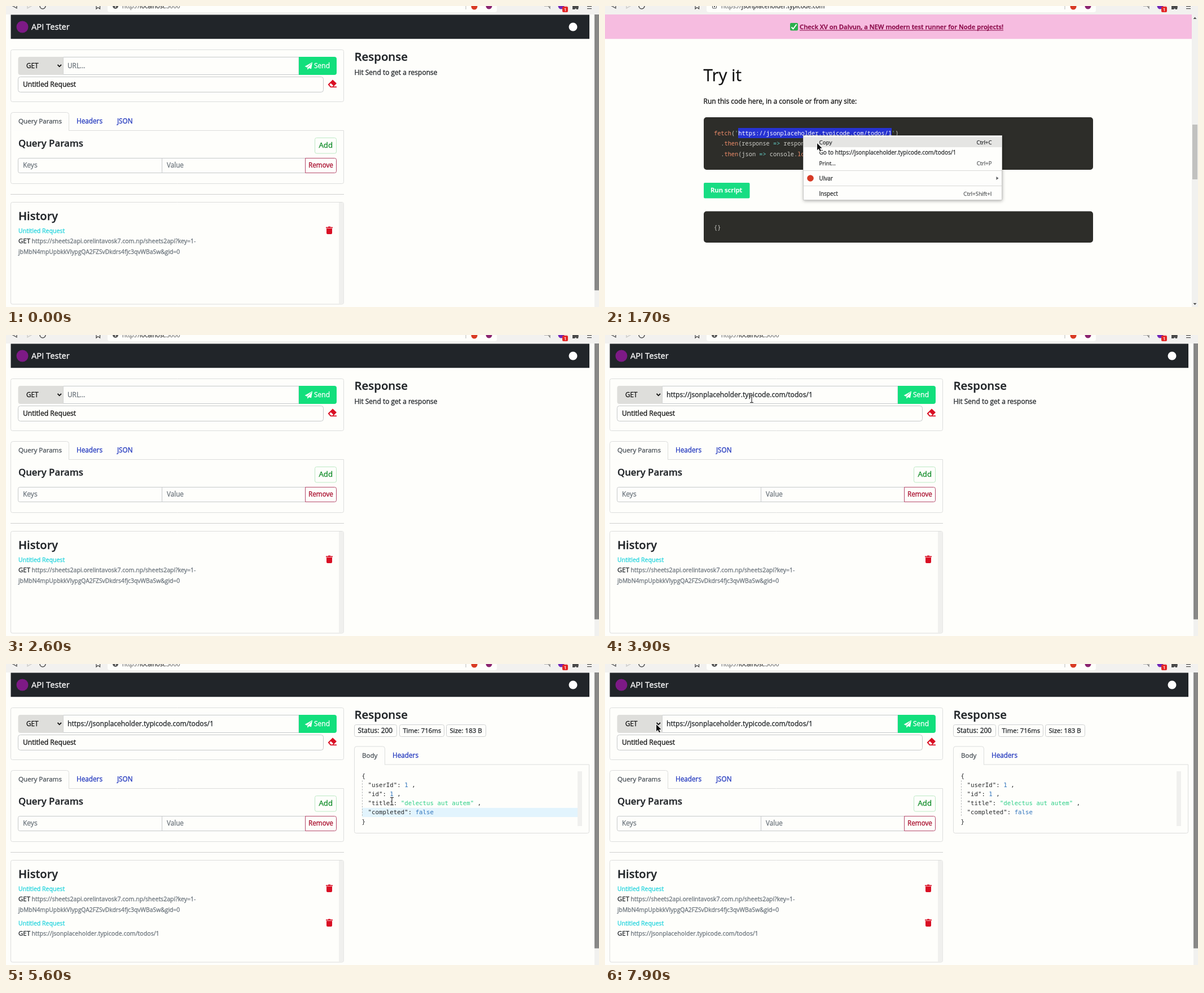
These frames come from a looping animation (1051 by 533 pixels, 8 s). An HTML page with a canvas:

```html
<!DOCTYPE html>
<html lang="en">
<head>
<meta charset="utf-8">
<title>API Tester</title>
<style>
html, body { margin: 0; width: 100%; height: 100%; overflow: hidden; background: #fefefb; }
canvas { display: block; }
</style>
</head>
<body>
<canvas id="stage" width="1051" height="533"></canvas>
<script>
const ctx = document.getElementById('stage').getContext('2d');
const LOOP = 8000;
const SANS = '"Open Sans", "Noto Sans", sans-serif';
const CODE = '"Noto Sans Mono", "DejaVu Sans Mono", monospace';
const MONO = '"DejaVu Sans Mono", monospace';
const PAGE = '#fefefb', INK = '#212529', MUTED = '#6c757d', LINE = '#dcdddc';
const FIELD = '#c6c9cb', LINK = '#1f35bd', RED = '#d90f24', GREEN = '#12df7c';
const API_URL = 'https://jsonplaceholder.typicode.com/todos/1';

// Pointer track: time, x, y, shape. It is hidden where no place is given.
const pointer = [
  [0], [1000, 312, 181, 'arrow'], [1200, 357, 227, 'beam'], [1500, 350, 229, 'arrow'],
  [1600, 361, 236, 'arrow'], [1700, 376, 243, 'arrow'], [2000, 330, 190, 'arrow'],
  [2100, 250, 122, 'arrow'], [2200, 192, 75, 'arrow'], [2600],
  [2800, 199, 38, 'arrow'], [2900, 207, 56, 'arrow'], [3100, 150, 80, 'arrow'],
  [3200, 114, 105, 'beam'], [3600, 118, 115, 'beam'], [3800, 170, 115, 'beam'],
  [3900, 260, 113, 'beam'], [4000, 370, 111, 'beam'], [4100, 470, 108, 'beam'],
  [4200, 530, 107, 'arrow'], [4300, 550, 107, 'arrow'], [5100, 605, 157, 'arrow'],
  [5200, 634, 190, 'arrow'], [5400, 676, 283, 'beam'], [5500, 688, 264, 'beam'],
  [5600, 684, 243, 'beam'], [5700, 545, 205, 'arrow'], [5800, 360, 168, 'arrow'],
  [5900, 218, 148, 'arrow'], [6100, 172, 122, 'arrow'], [6200, 120, 90, 'arrow'],
  [6300, 80, 77, 'arrow'], [6400, 84, 106, 'arrow'], [7800, 87, 107, 'arrow'],
  [7900, 91, 107, 'arrow']
];

function rect(x, y, w, h, color) {
  ctx.fillStyle = color;
  ctx.fillRect(x, y, w, h);
}

function box(x1, y1, x2, y2, radius, fill, stroke) {
  ctx.beginPath();
  ctx.roundRect(x1, y1, x2 - x1, y2 - y1, radius);
  if (fill) { ctx.fillStyle = fill; ctx.fill(); }
  if (stroke) { ctx.strokeStyle = stroke; ctx.lineWidth = 1; ctx.stroke(); }
}

function circle(x, y, r, color) {
  ctx.beginPath();
  ctx.arc(x, y, r, 0, Math.PI * 2);
  ctx.fillStyle = color;
  ctx.fill();
}

function trace(points, close) {
  ctx.beginPath();
  points.forEach(([x, y]) => ctx.lineTo(x, y));
  if (close) ctx.closePath();
}

function shape(points, color) {
  trace(points, true);
  ctx.fillStyle = color;
  ctx.fill();
}

function line(points, color, width = 1) {
  trace(points);
  ctx.strokeStyle = color;
  ctx.lineWidth = width;
  ctx.stroke();
}

// Proportional text gets a hairline outline for a slightly sturdier weight.
function text(str, x, y, size, color = INK, weight = 400, family = SANS) {
  ctx.font = `${weight} ${size}px ${family}`;
  ctx.fillStyle = color;
  ctx.fillText(str, x, y);
  if (family === SANS) {
    ctx.strokeStyle = color;
    ctx.lineWidth = 0.3;
    ctx.strokeText(str, x, y);
  }
  return x + ctx.measureText(str).width;
}

function textRight(str, x, y, size, color) {
  ctx.textAlign = 'right';
  text(str, x, y, size, color);
  ctx.textAlign = 'left';
}

// Parts alternate: string, colour, string, colour...
function runs(parts, x, y, size, family = SANS) {
  for (let i = 0; i < parts.length; i += 2) {
    x = text(parts[i], x, y, size, parts[i + 1], 400, family);
  }
}

function drawToolbar(secure) {
  rect(0, 0, 1051, 15, '#f2f1ef');
  box(180, -14, 870, 11, 4, PAGE);
  const dark = '#4a4a4a';
  line([[19, -3], [12, 0], [19, 4], [19, -3]], dark, 1.3);
  line([[38, -3], [45, 0], [38, 4], [38, -3]], '#c6c5c3', 1.2);
  ctx.beginPath();
  ctx.arc(65, 0, 5, -0.4, Math.PI);
  ctx.strokeStyle = dark;
  ctx.lineWidth = 1.4;
  ctx.stroke();
  line([[160, -4], [160, 5], [163, 2.5], [166.5, 5], [166.5, -4]], dark, 1.3);
  if (secure) {
    box(190.5, -2, 197.5, 4, 1, null, '#555');
    rect(193, 0, 2, 2, '#555');
    runs(['https://', '#777', 'jsonplaceholder.typicode.com', '#383838'], 206, 4, 10.55);
  } else {
    circle(194, 0, 5, '#555');
    rect(193.4, -1, 1.3, 4, '#fff');
    runs(['http://', '#777', 'localhost', '#383838', ':3000', '#777'], 206, 4, 10.6);
  }
  rect(814.5, 0, 1, 6, '#b9b9b7');
  circle(830, 1, 5.5, '#d93a24');
  circle(856, 0, 5.5, '#8b2470');
  line([[954, 0], [961, 0], [964, 4], [964, -2]], '#777', 1.2);
  circle(984, 0, 5.5, '#7028b8');
  box(986, 1, 996, 11, 2, '#e32626');
  text('1', 989, 9, 7.5, '#fff');
  shape([[1004, -3], [1014, -3], [1014, 0], [1015, 1], [1014, 6], [1011, 6],
    [1010, 4], [1008, 6], [1004, 6]], dark);
  rect(1030, 0, 8, 1.2, dark);
  rect(1030, 4, 8, 1.2, dark);
}

function drawTabs(x, top, width, right, bottom, activeLabel) {
  const base = top + 32;
  box(x, base, right, bottom, [0, 0, 3, 3], null, LINE);
  box(x, top, x + width, base, [4, 4, 0, 0], PAGE, LINE);
  rect(x + 0.5, base - 1, width - 1, 2, PAGE);
  text(activeLabel, x + 13.5, Math.floor(top + 20), 11.6, '#495057');
}

function drawTrash(y) {
  rect(567, y, 12, 1.8, RED);
  rect(571, y - 1, 4, 1.5, RED);
  box(568, y + 2.4, 578, y + 12.5, [0, 0, 2, 2], RED);
}

function drawRequest(pasted) {
  box(8.5, 77.5, 598.5, 169.5, 3, null, LINE);
  box(101.5, 90.5, 519, 121.5, 0, PAGE, FIELD);
  box(21.5, 90, 101.5, 122, [4, 0, 0, 4], '#dededb');
  text('GET', 36, 110, 11.7, '#111');
  line([[91.5, 104], [94.7, 107.3], [98, 104]], '#111', 1.8);
  if (pasted) text(API_URL, 109, 110, 12.13);
  else text('URL...', 109, 110, 11.8, MUTED);
  box(519, 90, 586, 122, [0, 4, 4, 0], GREEN);
  shape([[529.5, 107], [543, 99.5], [541, 111.5], [537, 110], [534.5, 113], [534, 109]], '#fff');
  line([[534, 109], [541.5, 101.5]], GREEN, 1);
  text('Send', 546, 110, 12, '#fff');
  box(21.5, 125.5, 562.5, 152.5, 4, PAGE, FIELD);
  text('Untitled Request', 30, 143, 12.1, '#111');
  shape([[570.5, 139], [579, 130.5], [586, 137], [580.5, 142.5], [586, 142.5],
    [586, 144.2], [575, 144.2]], RED);
  shape([[573.2, 139.2], [575.7, 136.8], [580, 141], [578.6, 142.4], [576, 142.4]], PAGE);
}

function drawParams() {
  drawTabs(8.5, 188.5, 103, 598.5, 314.5, 'Query Params');
  text('Headers', 125, 208, 11.75, LINK);
  text('JSON', 197, 208, 11.7, LINK);
  text('Query Params', 22, 249, 16.8, INK, 600);
  box(547.5, 233.5, 585.5, 261, 3, PAGE, '#bde9c4');
  text('Add', 554.5, 251, 13.2, '#0c8a25');
  box(21.5, 269.5, 277, 295.5, [3, 0, 0, 3], PAGE, FIELD);
  box(276.5, 269.5, 531, 295.5, 0, PAGE, FIELD);
  box(530.5, 269.5, 585.5, 295.5, [0, 3, 3, 0], PAGE, '#b54a6c');
  text('Keys', 30, 286, 12, MUTED);
  text('Value', 285, 286, 11.7, MUTED);
  text('Remove', 536, 286, 11.7, '#a80a2a', 500);
  rect(8, 333, 591, 1, '#cfd0cf');
}

function drawHistory(sent) {
  box(8.5, 347.5, 598.5, 528, 3, null, LINE);
  rect(590, 348, 8.5, 179.5, '#f0f0ee');
  text('History', 22, 379, 20.1, INK, 600);
  const title = y => text('Untitled Request', 22, y, 10.55, '#20d3dd');
  title(402);
  text('GET', 22, 420, 11.4);
  text('https://sheets2api.orelintavosk7.com.np/sheets2api?key=1-', 45.5, 420, 10.55, MUTED);
  text('jbMbN4mpUpbkkVlypgQA2FZSvDkdrs4fjc3qvWBaSw&gid=0', 22, 439, 10.35, MUTED);
  drawTrash(391.5);
  if (!sent) return;
  title(463);
  text('GET', 22, 481, 11.4);
  text(API_URL, 45.5, 481, 10.6, MUTED);
  drawTrash(452.5);
}

function drawPills(pills) {
  for (const [label, x1, x2, size] of pills) {
    box(x1 + 0.5, 107.5, x2 - 0.5, 128.5, 3, PAGE, '#cfd1d2');
    text(label, x1 + 6.5, 122, size);
  }
}

function drawJson(row) {
  const blue = '#2f74bd', key = '#26282a';
  if (row) rect(631, 190 + row * 16.2, 382, 16.2, '#e2f4fd');
  ctx.setLineDash([3, 2]);
  line([[631.5, 206], [631.5, 271]], '#b9bbbc');
  ctx.setLineDash([]);
  const rows = [
    ['{', key],
    ['"userId": ', key, '1', blue, ' ,', key],
    ['"id": ', key, '1', blue, ' ,', key],
    ['"title": ', key, '"delectus aut autem"', '#2bcf86', ' ,', key],
    ['"completed": ', key, 'false', blue],
    ['}', key]
  ];
  rows.forEach((parts, i) => {
    const x = i % 5 ? 641.5 : 630.5;
    runs(parts, x, Math.floor(202 + i * 16.2), 10.76, MONO);
  });
}

function drawResponse(sent, loaded, row) {
  text('Response', 617.5, 97, 20.4, INK, 600);
  if (!sent) {
    text('Hit Send to get a response', 617.5, 122, 12);
    return;
  }
  drawPills(loaded
    ? [['Status: 200', 617, 693, 12], ['Time: 716ms', 697, 777, 11.4], ['Size: 183 B', 780, 851, 11.5]]
    : [['Status:', 617, 673, 12], ['Time: ms', 673, 736, 11.4], ['Size:', 739, 779, 11.5]]);
  drawTabs(617.5, 146, 54, 1033.5, loaded ? 299.5 : 219, 'Body');
  text('Headers', 685, 166, 11.75, LINK);
  rect(1013, 190, 8, loaded ? 97 : 16.5, '#f0f0ee');
  if (loaded) drawJson(row);
  else text('""', 630.5, 202, 10.76, '#2bcf86', 400, MONO);
}

function drawApp(t) {
  const sent = t >= 4400;
  const row = t < 5400 || t >= 5700 ? 0 : t < 5500 ? 5 : 4;
  rect(8.5, 15.5, 1025.5, 42.7, INK);
  circle(29, 37, 10.5, '#7d1a86');
  text('API Tester', 45, 42, 14.7, '#fff');
  circle(1005, 37, 7.5, '#fff');
  rect(1043, 15, 8, 518, '#f1f1ef');
  rect(1043, 15, 8, 488.5, '#888887');
  drawRequest(t >= 3600);
  drawParams();
  drawHistory(sent);
  drawResponse(sent, t >= 5200, row);
}

function drawDocs() {
  rect(0, 15, 1040, 43.3, '#f6bce0');
  box(328, 30, 342, 43.5, 2, '#2bb04c');
  line([[330.5, 37.5], [333.5, 40.5], [339.5, 32.5]], '#fff', 2);
  const wine = '#8a0848';
  const end = text('Check XV on Dalvun, a NEW modern test runner for Node projects!', 345, 41, 11.3, wine, 600);
  rect(345, 42.5, end - 345, 1, wine);
  rect(1040, 15, 11, 518, '#f1f1ef');
  rect(1041, 210, 9, 97, '#c1c1bf');
  shape([[1042.5, 23], [1045.5, 19.5], [1048.5, 23]], '#555');
  shape([[1042.5, 526], [1045.5, 529.5], [1048.5, 526]], '#555');

  text('Try it', 174.5, 133, 29.6, '#111');
  text('Run this code here, in a console or from any site:', 174.5, 173, 12, '#111');
  const panel = '#2d2d29', plain = '#cfcfca', call = '#f08d6a', arrow = '#64cfc8', quote = '#7ec699';
  box(175, 197, 865, 290, 5, panel);
  rect(236, 216, 272, 18, '#2733d3');
  runs(['fetch', call, '(', plain, "'", quote, API_URL, '#fff', "'", quote, ')', plain], 193, 229, 10.3, CODE);
  runs(['.', plain, 'then', call, '(response ', plain, '=>', arrow, ' response.', plain,
    'json', call, '())', plain], 205.3, 247, 10.3, CODE);
  runs(['.', plain, 'then', call, '(json ', plain, '=>', arrow, ' console.', plain,
    'log', call, '(json))', plain], 205.3, 266, 10.3, CODE);
  box(175, 313, 256.5, 340.5, 2, '#17dd83');
  text('Run script', 187, 330, 11.5, '#fff', 600);
  box(175, 363.5, 865, 419, 5, panel);
  text('{}', 193, 396, 10.3, plain, 400, CODE);
}

function drawMenu(hover) {
  ctx.save();
  ctx.shadowColor = 'rgba(0,0,0,.35)';
  ctx.shadowBlur = 6;
  ctx.shadowOffsetY = 1;
  box(351.5, 229, 703.5, 344, 0, '#fefefc');
  ctx.restore();
  box(351.5, 229.5, 703.5, 343.5, 0, null, '#c9c9c7');
  if (hover) rect(352, 232, 351, 18, '#e5e5e3');
  const ink = '#303234', soft = '#5f6163';
  text('Copy', 379.5, 245, 9.8, ink);
  textRight('Ctrl+C', 685.5, 245, 9.5, hover ? ink : soft);
  text('Go to ' + API_URL, 379.5, 263, 10.06, ink);
  text('Print...', 379.5, 282, 9.7, ink);
  textRight('Ctrl+P', 685.5, 282, 9.5, soft);
  rect(352, 291, 351, 1, '#dadad8');
  circle(364, 305, 5.8, '#d63a25');
  text('Ulvar', 379.5, 309, 9.9, ink);
  shape([[693.5, 302], [697.5, 305], [693.5, 308]], soft);
  rect(352, 318, 351, 1, '#dadad8');
  text('Inspect', 379.5, 336, 9.9, ink);
  textRight('Ctrl+Shift+I', 685.5, 336, 9.7, soft);
}

function drawPointer(t) {
  const [, x, y, kind] = pointer.findLast(pose => pose[0] <= t);
  if (!kind) return;
  ctx.save();
  ctx.translate(x, y);
  if (kind === 'arrow') {
    const outline = [[0, 0], [0, 12.3], [2.8, 9.8], [4.9, 14.3], [6.9, 13.4], [4.9, 9], [8.6, 8.7]];
    trace(outline, true);
    ctx.strokeStyle = '#fff';
    ctx.lineWidth = 1.4;
    ctx.stroke();
    shape(outline, '#111');
  } else {
    for (const [color, width] of [['#fff', 2.4], ['#222', 1.1]]) {
      line([[0, -6], [0, 6]], color, width);
      line([[-3, -6.5], [3, -6.5]], color, width);
      line([[-3, 6.5], [3, 6.5]], color, width);
    }
  }
  ctx.restore();
}

function draw() {
  const t = performance.now() % LOOP;
  const docs = t >= 600 && t < 2600;
  rect(0, 0, 1051, 533, PAGE);
  drawToolbar(docs);
  if (docs) drawDocs();
  else drawApp(t);
  if (t >= 1500 && t < 1900) drawMenu(t >= 1600);
  drawPointer(t);
  requestAnimationFrame(draw);
}

draw();
</script>
</body>
</html>
```
